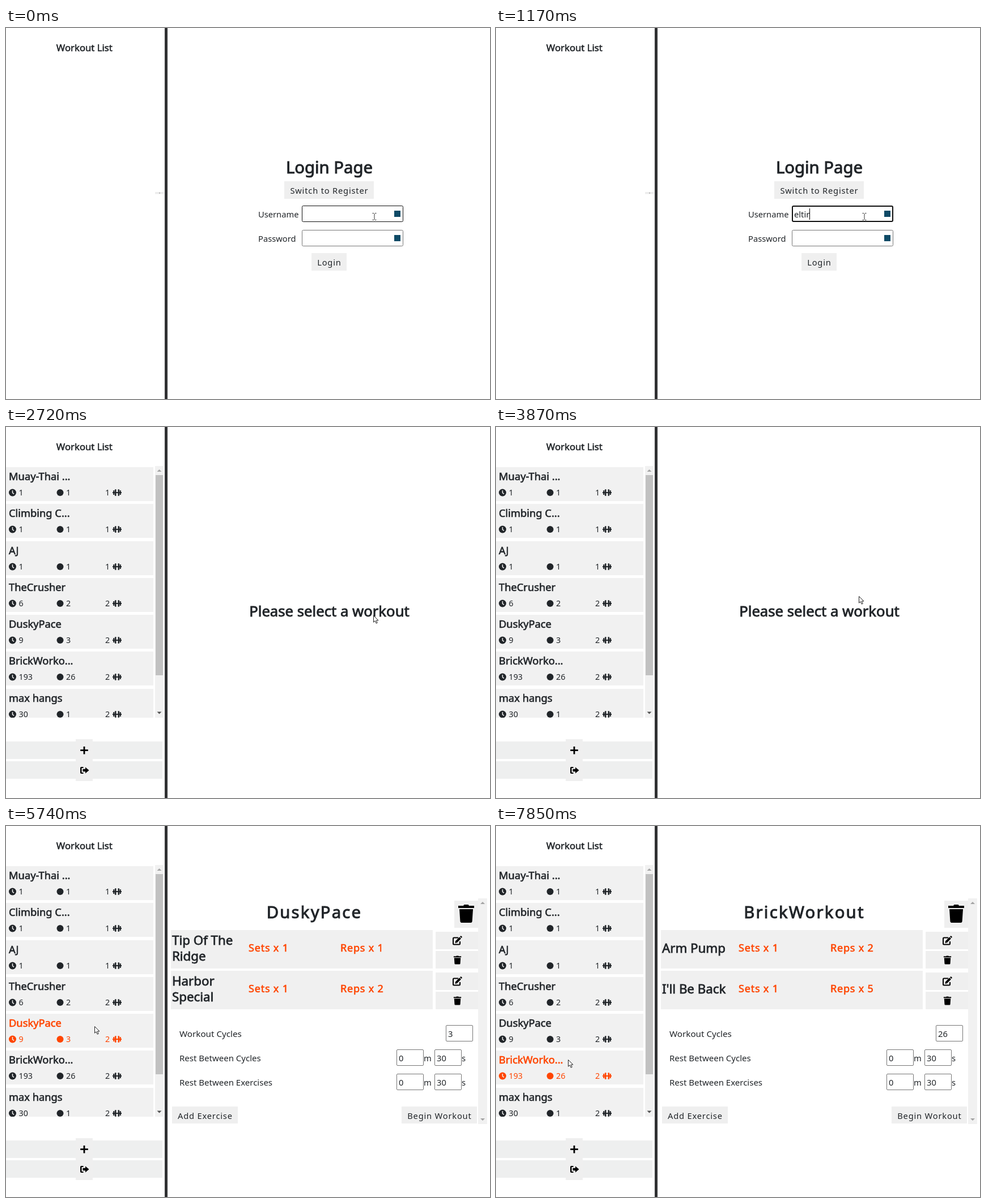
Recreate the animation shown at these times as an HTML page. Size 854 by 656 pixels, loop 8000 ms.

```html
<!DOCTYPE html>
<html lang="en">
<head>
<meta charset="utf-8">
<title>Workout planner</title>
<style>
  html, body { margin: 0; width: 100%; height: 100%; overflow: hidden; background: #fff; }
  svg { display: block; width: 854px; height: 656px; }
  text { font: 14.7px "Noto Sans", "Open Sans", sans-serif; fill: currentColor; white-space: pre; }
  /* Semi-bold look, between the regular and bold cuts */
  .semi { stroke: currentColor; stroke-width: .034em; }
  .mid { text-anchor: middle; }
  .end { text-anchor: end; }
  .spaced { letter-spacing: .8px; }
</style>
</head>
<body>
<svg id="stage" viewBox="0 0 854 656" color="#212529"></svg>
<script>
const LOOP = 8000;
const ORANGE = '#ff4500', INK = '#212529', BUTTON = '#efefef';
const USER = 'eltir';

const rect = (x, y, w, h, fill, extra = '') =>
  `<rect x="${x}" y="${y}" width="${w}" height="${h}" fill="${fill}" ${extra}/>`;
const text = (x, y, str, size = 14.7, cls = '', extra = '') =>
  `<text x="${x}" y="${y}" class="${cls}" style="font-size:${size}px" ${extra}>${str}</text>`;
const path = (d, fill = 'currentColor', extra = '') => `<path d="${d}" fill="${fill}" ${extra}/>`;
const line = (d, color, width = 1, extra = '') =>
  path(d, 'none', `stroke="${color}" stroke-width="${width}" ${extra}`);
const group = (id, body, extra = '') => `<g id="${id}" ${extra}>${body}</g>`;
const at = (x, y, body, scale = 1) => `<g transform="translate(${x} ${y}) scale(${scale})">${body}</g>`;
const button = (x, y, w, h, label) =>
  rect(x, y, w, h, BUTTON) + text(x + w / 2 + .4, y + 21.5, label, 14.7, 'mid spaced');
const field = (x, y, w, id = '') =>
  rect(x + .5, y + .5, w - 1, 28, '#fff', `id="${id}" stroke="#767676" rx="1.5"`);
const badge = y => rect(685, y, 11, 11, '#0e4a66');

const trash = path('M-6 -4H6L5.3 6.6Q5.2 8 3.8 8H-3.8Q-5.2 8 -5.3 6.6ZM-7 -7H-2.5L-1.8 -8H1.8L2.5 -7H7V-5H-7Z', '#000');
const edit = line('M2 -5H-5.5Q-7 -5 -7 -3.5V5.5Q-7 7 -5.5 7H3.5Q5 7 5 5.5V1.5', '#000', 2) +
  path('M-3 1L4.2 -6.2L7 -3.4L-.2 3.8L-3.6 4.4ZM5 -7L6 -8Q6.8 -8.6 7.6 -7.8L8.5 -6.9Q9.1 -6.1 8.4 -5.3L7.6 -4.4Z', '#000');
const clock = '<circle r="6.5" fill="currentColor"/>' + line('M0 -4V.4L2.6 2.4', '#f1f1f1', 1.5);
const dumbbell = path('M-8 -1H8V1H-8ZM-6.8 -4H-4.6V4H-6.8ZM-4 -5.7H-1.5V5.7H-4ZM1.5 -5.7H4V5.7H1.5ZM4.6 -4H6.8V4H4.6Z');
const logout = path('M-2 -6H-5.5Q-7.5 -6 -7.5 -4V4Q-7.5 6 -5.5 6H-2V4H-5V-4H-2ZM-3 -2.2H1.5V-5.6L8 0L1.5 5.6V2.2H-3Z', '#000');
const arrowUp = color => path('M-4 2L0 -2L4 2Z', color);
const arrowDown = color => path('M-4 -2L0 2L4 -2Z', color);

function loginPage() {
  return rect(263, 290, 16, 3.5, '#ececec') + rect(270, 291, 2, 1.5, '#aaa') +
    text(570.5, 257, 'Login Page', 29.3, 'semi mid') +
    button(491, 271, 158, 31, 'Switch to Register') +
    text(445, 335, 'Username') + text(445, 378, 'Password') +
    field(522, 314, 179, 'userField') + field(522, 357, 179, 'passField') +
    badge(323) + badge(366) +
    text(526, 335, '', 14.7, '', 'id="userText"') +
    '<circle id="dot1" cx="529.5" cy="372.5" r="2.2"/><circle id="dot2" cx="535.5" cy="372.5" r="2.2"/>' +
    rect(0, 0, 1, 20, '#000', 'id="caret"') +
    button(539, 398, 62, 31, 'Login');
}

function popup() {
  return rect(522, 347, 288, 169, '#fff', 'rx="8" filter="url(#soft)"') +
    path('M522 386V355Q522 347 530 347H802Q810 347 810 355V386Z', '#f4f8f7') +
    rect(539.5, 363, 11, 11, '#333') +
    text(563, 373, 'Log in as', 11.3, '', 'color="#222"') +
    line('M788 363.5L798 373.5M798 363.5L788 373.5', '#555', 1.3) +
    rect(541.5, 417.5, 15, 11, 'none', 'rx="1" stroke="#222" stroke-width="1.6"') +
    line('M545 417V413.5Q545 410 549 410T553 413.5V417M549 421V425', '#222', 1.6) +
    text(572, 414, 'workoutplanner-dev.eu-west-2.elasticb...', 11.4, '', 'color="#666"') +
    text(572, 434, USER, 14.5, '', 'color="#111"') +
    line('M540 454.5H792', '#eee') +
    line('M547 479.5L553.5 492.5H540.5Z', '#d22f45', 1.4) +
    line('M547 484V488.5M547 489.6V491', '#d22f45', 1.3) +
    text(564.5, 483, 'This website is not secure. Information you', 11.2, '', 'color="#555"') +
    text(564.5, 498, 'enter here could be compromised.', 11.2, '', 'color="#555"');
}

const rows = [
  ['Muay-Thai ...', 1, 1, 1], ['Climbing C...', 1, 1, 1], ['AJ', 1, 1, 1], ['TheCrusher', 6, 2, 2],
  ['DuskyPace', 9, 3, 2], ['BrickWorko...', 193, 26, 2], ['max hangs', 30, 1, 2]
];
const rowTop = i => 71 + Math.round(i * 65.25);

function workoutList() {
  const cards = rows.map(([name, time, cycles, count], i) => group('row' + i,
    rect(0, 0, 260, 60, '#f1f1f1') + text(5, 23, name, 18.3, 'semi') +
    at(11.5, 45, clock) + text(22.5, 50, time, 14.3) +
    '<circle cx="95.5" cy="45" r="6" fill="currentColor"/>' + text(106, 50, cycles, 14.3) +
    text(175, 50, count, 14.3) + at(196, 45, dumbbell),
    `transform="translate(0 ${rowTop(i)})"`)).join('');
  return `<g clip-path="url(#listClip)">${cards}</g>` +
    rect(263, 69, 15, 445, '#f1f1f1') + rect(264, 85, 13, 354, '#c1c1c1') +
    at(270.5, 77, arrowUp('#a3a3a3')) + at(270.5, 505.5, arrowDown('#505050')) +
    rect(0, 556, 276, 31, '#eeefef') + rect(0, 591, 276, 31, '#eeefef') +
    rect(123, 552, 30, 74, BUTTON) +
    line('M138 565V578.5M131.2 571.7H144.8', '#000', 2.8) + at(138.5, 607, logout);
}

const numberField = (x, y, value, id = '') =>
  field(x, y, 48) + text(x + 4, y + 21, value, 14.7, '', `id="${id}"`);
const exerciseTop = i => Math.floor(184 + 72.5 * i);

function workoutPage() {
  const exercise = i => {
    const y = exerciseTop(i);
    return rect(291, y, 462, 68, '#f0f0f0') + group('name' + i, '') +
      text(428, y + 38, 'Sets x 1', 18, 'semi spaced', `color="${ORANGE}"`) +
      text(590, y + 38, '', 18, 'semi spaced', `id="reps${i}" color="${ORANGE}"`) +
      rect(758, y + 3, 75, 31, BUTTON) + rect(758, y + 37, 75, 31, BUTTON) +
      at(796, y + 18.5, edit) + at(796.5, y + 53, trash, .95);
  };
  const rest = (y, label) => text(306, y + 21, label, 15) +
    numberField(689, y, 0) + text(737, y + 21, 'm') +
    numberField(756, y, 30) + text(804, y + 21, 's');
  return rect(833, 128, 16, 399, '#f1f1f1') +
    at(841, 136, arrowUp('#a3a3a3')) + at(841, 519, arrowDown('#a3a3a3')) +
    rect(791, 132, 42, 48, BUTTON) + at(812, 155, trash, 2) +
    text(544, 163, '', 29.3, 'semi mid', 'id="title" letter-spacing="2.2"') +
    exercise(0) + exercise(1) +
    text(306, 373, 'Workout Cycles', 15.2) + numberField(776, 352, '', 'cycles') +
    rest(395, 'Rest Between Cycles') + rest(438, 'Rest Between Exercises') +
    button(293, 496, 116, 30, 'Add Exercise') + button(698, 496, 133, 30, 'Begin Workout');
}

const workouts = [
  { title: 'DuskyPace', cycles: 3, reps: [1, 2], names: [['Tip Of The', 'Ridge'], ['Harbor', 'Special']] },
  { title: 'BrickWorkout', cycles: 26, reps: [2, 5], names: [['Arm Pump'], ["I'll Be Back"]] }
];

document.getElementById('stage').innerHTML =
  '<defs><clipPath id="listClip"><path d="M0 69H260V514H0Z"/></clipPath>' +
  '<filter id="soft" x="-10%" y="-15%" width="120%" height="135%"><feDropShadow dx="0" dy="3" stdDeviation="6" flood-opacity=".16"/></filter></defs>' +
  rect(0, 0, 854, 656, '#fff') +
  text(138.3, 40.5, 'Workout List', 16.7, 'semi mid') +
  group('login', loginPage()) +
  group('list', workoutList()) +
  group('prompt', text(570.5, 334.5, 'Please select a workout', 25.7, 'semi mid')) +
  group('workout', workoutPage()) +
  rect(280, 0, 5, 656, '#303133') +
  group('popup', popup()) +
  group('status', path('M0 638H272Q276 638 276 642V656H0Z', '#dee1e6') +
    text(265, 653, 'Waiting for workoutplanner-dev.eu-west-2.elasticbea...', 10.8, 'end', 'color="#4d5156"')) +
  group('beam', line('M646.5 327.5H649M651 327.5H653.5M650 328V339M646.5 339.5H649M651 339.5H653.5', '#333')) +
  group('arrow', path('M.5 .5V12.2L3.2 9.7L5.2 14.2L7.2 13.3L5.2 9H9Z', '#fff', 'stroke="#222" stroke-width="1"'));

const el = {};
document.querySelectorAll('[id]').forEach(node => { if (node.id) el[node.id] = node; });
const show = (id, on) => el[id].setAttribute('display', on ? 'inline' : 'none');
const between = (t, a, b) => t >= a && t < b;
// Number of listed moments already reached.
const reached = (t, times) => times.filter(time => t >= time).length;

// Pointer keys: time, x, y
const route = [
  [3790, 648, 333], [3868, 639.5, 299], [4024, 540, 205], [4180, 420, 140], [4336, 320, 120], [4492, 240, 152],
  [4648, 188, 222], [4726, 177, 256], [4804, 167, 284], [4960, 164, 318], [5116, 164, 332], [5350, 164, 339],
  [5430, 164, 339], [5506, 152, 348], [5662, 152, 348], [5740, 156, 354], [6910, 156, 354],
  [7144, 148, 376], [7450, 128, 402], [7530, 128, 402], [7612, 115, 409], [7768, 115, 409], [7846, 127, 412.5]
];
const TICK = 78;

function pointer(t) {
  const q = 3868 + Math.floor((t - 3868) / TICK) * TICK;
  const next = route.findIndex(key => key[0] > q);
  if (next === 0) return route[0].slice(1);
  if (next < 0) return route[route.length - 1].slice(1);
  const [t0, x0, y0] = route[next - 1], [t1, x1, y1] = route[next];
  const k = (q - t0) / (t1 - t0);
  return [x0 + (x1 - x0) * k, y0 + (y1 - y0) * k];
}

function focusField(id, amount, y) {
  const inset = amount === 1 ? 1 : .5;
  const attrs = { x: 522 + inset, y: y + inset, width: 179 - 2 * inset, height: 29 - 2 * inset, rx: 2,
    'stroke-width': 2 * inset, stroke: amount ? '#101010' : '#767676' };
  for (const name in attrs) el[id].setAttribute(name, attrs[name]);
}

function renderLogin(t) {
  const onPassword = t >= 1470;
  const typed = reached(t, [400, 780, 860, 1010, 1170]);
  const dots = reached(t, [1790, 1870]);
  focusField('userField', onPassword ? 0 : t >= 240 ? 1 : .5, 314);
  focusField('passField', onPassword ? 1 : 0, 357);
  el.userText.textContent = USER.slice(0, typed);
  show('dot1', dots > 0);
  show('dot2', dots > 1);
  const x = onPassword ? 526 + dots * 6 : 526 + (typed ? el.userText.getComputedTextLength() : 0);
  el.caret.setAttribute('x', Math.round(x));
  el.caret.setAttribute('y', onPassword ? 362 : 319);
  show('caret', between(t, 240, 2420));
}

function renderWorkout(t) {
  const { title, cycles, reps, names } = workouts[t < 7846 ? 0 : 1];
  el.title.textContent = title;
  el.cycles.textContent = cycles;
  names.forEach((lines, i) => {
    const y = exerciseTop(i) + (lines.length > 1 ? 26 : 40);
    el['name' + i].innerHTML = lines.map((str, n) => text(293, y + 28 * n, str, 22.3, 'semi')).join('');
    el['reps' + i].textContent = 'Reps x ' + reps[i];
  });
}

function render(t) {
  const loggedIn = t >= 2650, opened = t >= 5740;
  show('login', !loggedIn);
  show('list', loggedIn);
  show('prompt', loggedIn && !opened);
  show('workout', opened);
  if (!loggedIn) renderLogin(t);
  if (opened) renderWorkout(t);

  const fade = [0, .3, .62, .9, .9, .6, .3, 0];
  el.popup.setAttribute('opacity', fade[reached(t, [630, 700, 780, 860, 940, 1010, 1090])]);
  el.status.setAttribute('opacity', [0, .5, 1, .5, 0][reached(t, [400, 470, 1010, 1090])]);

  const arrowOn = t >= 1470 || between(t, 400, 630);
  const [x, y] = pointer(t);
  show('beam', !arrowOn);
  show('arrow', arrowOn);
  el.arrow.setAttribute('transform', `translate(${Math.round(x)} ${Math.round(y)})`);
  rows.forEach((_, i) => {
    const top = rowTop(i);
    el['row' + i].setAttribute('color', loggedIn && x < 260 && between(y, top, top + 60) ? ORANGE : INK);
  });
}

function tick() {
  render(performance.now() % LOOP);
  requestAnimationFrame(tick);
}
tick();
</script>
</body>
</html>
```
